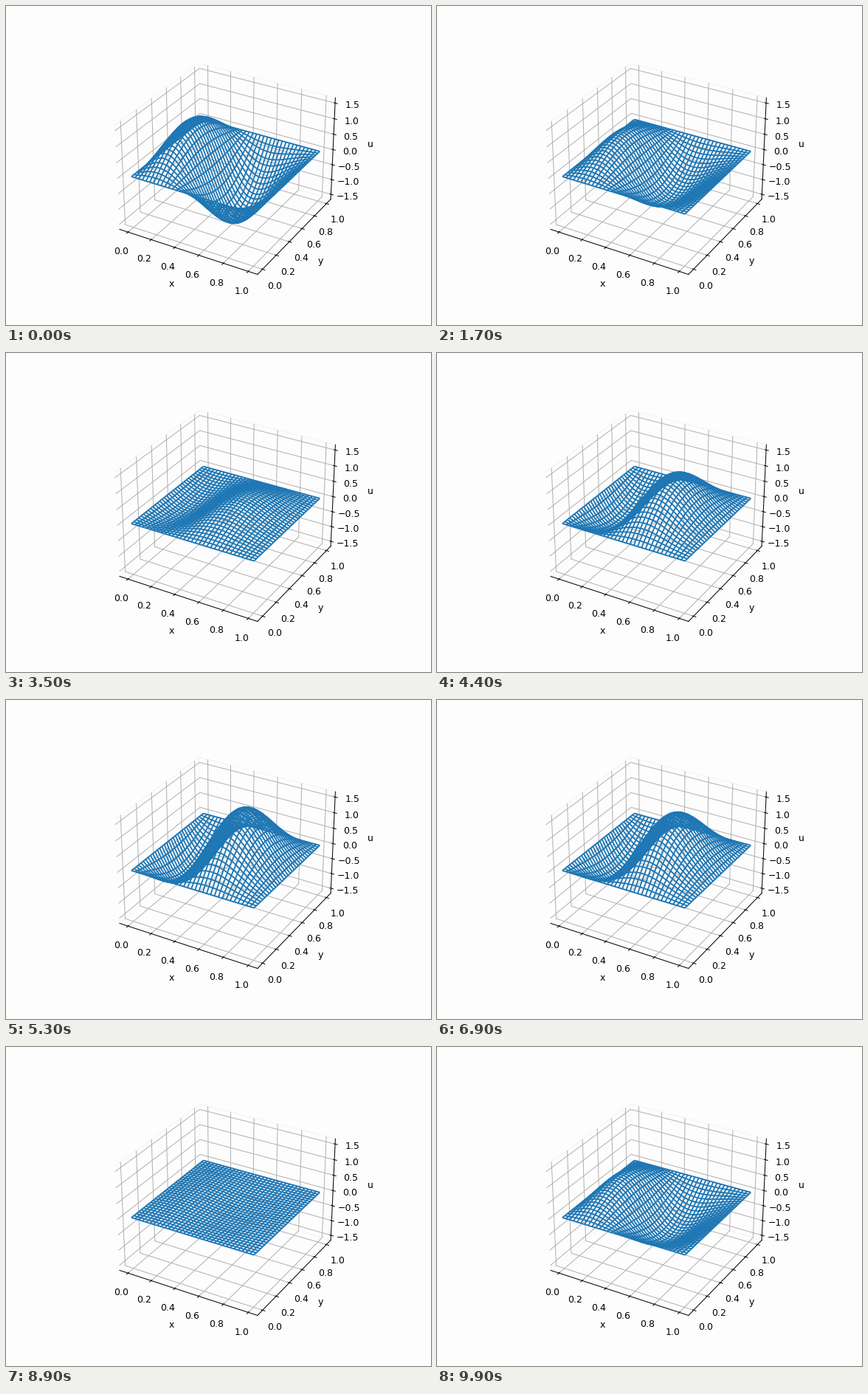
Animation, 576 px wide and 432 px high, one loop 10000 ms. Source, as a matplotlib script:

```python
import numpy as np
import matplotlib.pyplot as plt
from matplotlib.animation import FuncAnimation

FRAMES, INTERVAL = 100, 100
OMEGA = 0.0535          # phase advance per frame
CELLS = 32
PAPER = "#fdfdfd"


def mode_shape(x, y):
    """Lopsided standing wave, fixed at zero on all four edges."""
    sx = (-0.82 * np.sin(np.pi * x)
          + 1.04 * np.sin(2 * np.pi * x)
          + 0.515 * np.sin(3 * np.pi * x))
    return sx * np.sin(np.pi * y)


def widen(lo, hi, *margins):
    for m in margins:
        d = (hi - lo) * m
        lo, hi = lo - d, hi + d
    return lo, hi


plt.rcParams["font.family"] = "DejaVu Sans"
fig = plt.figure(figsize=(6.4, 4.8), dpi=90, facecolor=PAPER)
ax = fig.add_subplot(projection="3d", facecolor=PAPER)

side = np.linspace(0, 1, CELLS + 1)
X, Y = np.meshgrid(side, side)
SHAPE = mode_shape(X, Y)

# Data margin plus the small gap between the data box and the panes.
GAP = 1 / 48
ax.set_xlim(*widen(0, 1, 0.05, 0))
ax.set_xlim(-0.05 - 1.1 * GAP, 1.05 + 1.1 * GAP)
ax.set_ylim(-0.05 - 1.1 * GAP, 1.05 + 1.1 * GAP)
ax.set_zlim(*widen(-1.6, 1.6, GAP))
ax.set_xlabel("x")
ax.set_ylabel("y")
ax.set_zlabel("u")
for axis in (ax.xaxis, ax.yaxis, ax.zaxis):
    axis.pane.set_facecolor(PAPER)
    axis.pane.set_edgecolor("#f5f5f5")
    axis.pane.set_alpha(1)

wire = None


def update(i):
    global wire
    if wire is not None:
        wire.remove()
    wire = ax.plot_wireframe(X, Y, SHAPE * np.cos(OMEGA * i), color="C0")
    return (wire,)


anim = FuncAnimation(fig, update, frames=FRAMES, interval=INTERVAL,
                     init_func=lambda: update(0), repeat=True,
                     repeat_delay=0, blit=False)
plt.show()
```
